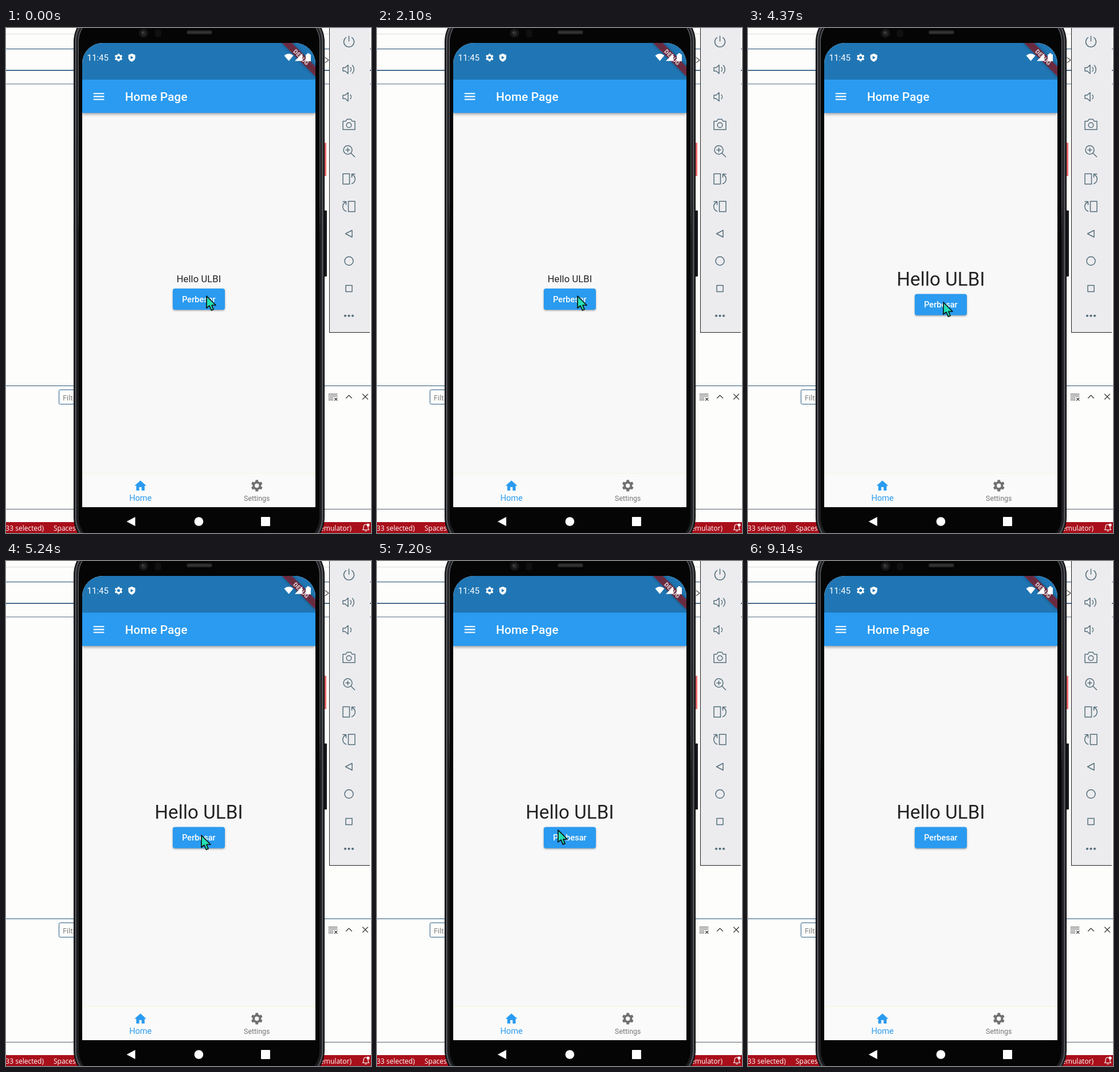
Recreate the animation shown at these times as an HTML page with a canvas. Size 637x880 px, loop 9.2 s.

```html
<!DOCTYPE html>
<html lang="en">
<head>
<meta charset="utf-8">
<title>Phone emulator</title>
<style>
html, body { margin: 0; width: 100%; height: 100%; overflow: hidden; background: #fdfdfd; }
canvas { display: block; width: 637px; height: 880px; }
</style>
</head>
<body>
<canvas id="stage" width="637" height="880"></canvas>
<script>
const ctx = document.getElementById('stage').getContext('2d');
const LOOP = 9200;
const GROW_AT = 2600;
const BLUE = '#2a9bf0';
const INK = '#566f7b';

// time, x, y of the pointer
const pointerKeys = [
  [0, 350, 467], [2900, 350, 467], [3400, 306, 461], [3700, 306, 461],
  [4300, 341, 478], [5600, 341, 478], [5800, 341, 480], [7100, 341, 480],
  [7700, 10, 333], [8480, 10, 333], [8640, -30, 333], [LOOP, -30, 333]
];

function rect(x, y, w, h, color) {
  ctx.fillStyle = color;
  ctx.fillRect(x, y, w, h);
}

function round(x, y, w, h, r, color) {
  ctx.beginPath();
  ctx.roundRect(x, y, w, h, r);
  ctx.fillStyle = color;
  ctx.fill();
}

function disc(x, y, r, color) {
  ctx.beginPath();
  ctx.arc(x, y, r, 0, Math.PI * 2);
  ctx.fillStyle = color;
  ctx.fill();
}

function text(str, x, y, font, color, align = 'left', spacing = 0) {
  ctx.font = font;
  ctx.fillStyle = color;
  ctx.textAlign = align;
  ctx.letterSpacing = spacing + 'px';
  ctx.fillText(str, x, y);
}

function at(x, y, draw) {
  ctx.save();
  ctx.translate(x, y);
  draw();
  ctx.restore();
}

function fillPath(x, y, d, color, scale = 1) {
  at(x, y, () => {
    ctx.scale(scale, scale);
    ctx.fillStyle = color;
    ctx.fill(new Path2D(d), 'evenodd');
  });
}

function strokePath(x, y, d, color = INK, width = 1.5) {
  at(x, y, () => {
    ctx.strokeStyle = color;
    ctx.lineWidth = width;
    ctx.lineCap = ctx.lineJoin = 'round';
    ctx.stroke(new Path2D(d));
  });
}

function gear(x, y, r, color) {
  ctx.beginPath();
  for (let k = 0; k < 6; k++) {
    const a = k * Math.PI / 3 - Math.PI / 2;
    for (const [m, d] of [[0.74, -0.34], [1, -0.22], [1, 0.22], [0.74, 0.34]]) {
      ctx.lineTo(x + r * m * Math.cos(a + d), y + r * m * Math.sin(a + d));
    }
  }
  ctx.closePath();
  ctx.moveTo(x + r * 0.36, y);
  ctx.arc(x, y, r * 0.36, 0, Math.PI * 2);
  ctx.fillStyle = color;
  ctx.fill('evenodd');
}

function shadow(color, blur, dy) {
  ctx.shadowColor = color;
  ctx.shadowBlur = blur;
  ctx.shadowOffsetY = dy;
}

function drawEditor() {
  rect(0, 0, 637, 880, '#fdfdfc');
  rect(0, 10, 637, 1, '#dcdcdc');
  rect(0, 36, 637, 1, '#1f4a6e');
  rect(0, 73, 637, 1.5, '#123f68');
  rect(0, 97, 637, 1, '#5d7487');
  strokePath(557, 56, 'M0-4.5L6 0 0 4.5', '#444', 1.1);
  rect(0, 623, 637, 1, '#2d5876');
  rect(0, 838, 637, 1, '#55616a');

  ctx.strokeStyle = '#2b5f86';
  ctx.lineWidth = 1;
  ctx.beginPath();
  ctx.roundRect(92.5, 630.5, 60, 25, 2);
  ctx.stroke();
  text('Filter', 99, 649, '13px "Open Sans", sans-serif', '#777');

  strokePath(563, 643, 'M0-5H15M0-1.7H15M0 1.7H8M0 5H8M10.5 1.5L15 6M15 1.5L10.5 6', '#333', 1.1);
  strokePath(598.5, 642.5, 'M-5 2.5L0-2.5 5 2.5', '#333', 1.1);
  strokePath(627, 642.5, 'M-4.5-4.5L4.5 4.5M4.5-4.5L-4.5 4.5', '#333', 1.1);

  rect(0, 861, 637, 19, '#a90f1b');
  const font = '12px "Open Sans", sans-serif';
  text('33 selected)', 66, 876, font, '#fff', 'right');
  text('Spaces: 2', 83, 876, font, '#fff');
  text('emulator)', 603, 876, font, '#fff', 'right');
  strokePath(628, 871, 'M-5.5 3.5H5.5L4 1V-2A4 4 0 0 0-4-2V1ZM-1.5 5.5H1.5', '#fff', 1.2);
  disc(632, 866, 2.6, '#fff');
}

function drawToolbar() {
  rect(564, 0, 71, 530.5, '#ececef');
  rect(564, 0, 1, 531, '#222');
  rect(564, 530, 71, 1, '#222');
  const speaker = 'M-10.5-3H-6.5L-1.5-7.5V7.5L-6.5 3H-10.5Z';
  const icons = [
    [24, 'M0-10V-1M-5-7.5A9 9 0 1 0 5-7.5'],
    [72, speaker + 'M2.5-3.5A5 5 0 0 1 2.5 3.5M6-7A10 10 0 0 1 6 7'],
    [120, speaker + 'M2.5-3.5A5 5 0 0 1 2.5 3.5'],
    [168, 'M-10.5-5.5H-5.5L-3.5-9H3.5L5.5-5.5H10.5V9H-10.5ZM4.3 1.3A4.3 4.3 0 1 0-4.3 1.3A4.3 4.3 0 1 0 4.3 1.3'],
    [215, 'M5.5-2.5A7.5 7.5 0 1 0-9.5-2.5A7.5 7.5 0 1 0 5.5-2.5M3.5 3L10 9.5M-5.5-2.5H1.5M-2-6V1'],
    [263, 'M-10.5-9H1V9H-10.5ZM5 8.5C12.5 5 12.5-4 6-7.5M5-3V-8.5H10.5'],
    [311, 'M10.5-9H-1V9H10.5ZM-5 8.5C-12.5 5-12.5-4-6-7.5M-5-3V-8.5H-10.5'],
    [358.5, 'M5.5-6V6L-6 0Z'],
    [406, 'M7.5 0A7.5 7.5 0 1 0-7.5 0A7.5 7.5 0 1 0 7.5 0'],
    [454, 'M-5.5-5.5H5.5V5.5H-5.5Z']
  ];
  for (const [y, d] of icons) strokePath(598.5, y, d);
  for (const dx of [-6.5, 0, 6.5]) disc(598.5 + dx, 501.5, 2.1, INK);
}

function drawBody() {
  rect(554, 200, 5, 58, '#e4686a');
  round(554, 318, 6, 115, 1, '#17181a');
  const shell = (inset, color) =>
    round(118 + inset, -31 + inset, 438 - 2 * inset, 939 - 2 * inset, 55 - inset, color);
  const shine = ctx.createLinearGradient(0, 0, 0, 370);
  shine.addColorStop(0, '#5c5e63');
  shine.addColorStop(0.8, '#4a4c50');
  shine.addColorStop(1, '#1c1d1f');
  shell(0, '#0b0b0c');
  shell(2, '#4a4c51');
  shell(5, '#1c1d1f');
  shell(7.5, shine);
  shell(9, '#050505');
  disc(240, 9, 8, '#161616');
  disc(240, 9, 4, '#2a2a2a');
  disc(238.5, 7.5, 1.3, '#555');
  round(260, 3, 11, 13, 4, '#101010');
  round(315, 4, 45, 7, 3.5, '#232323');
  round(317, 6, 41, 3, 1.5, '#343434');
}

function drawStatusIcons() {
  text('11:45', 141.5, 57, '15px Roboto, sans-serif', '#fff');
  gear(196.5, 51.5, 7, '#fff');
  fillPath(219.5, 51.5, 'M0-7L6-4.5V0C6 3.5 3.5 6 0 7.2C-3.5 6-6 3.5-6 0V-4.5ZM-2-3V3L3 0Z', '#fff');
  fillPath(493.5, 57.5, 'M0 0L-8-9.5Q0-16 8-9.5Z', '#fff');
  fillPath(504, 57.5, 'M0 0H13V-13Z', '#fff');
  fillPath(527.5, 51, 'M-4.5-5H-2V-7H2V-5H4.5V7H-4.5Z', '#fff');
}

function drawBanner() {
  at(540, 26, () => {
    ctx.rotate(Math.PI / 4);
    ctx.scale(1.034, 1.034);
    ctx.save();
    shadow('rgba(0,0,0,.5)', 6, 0);
    rect(-40, 28, 80, 12, 'rgba(150,20,30,.65)');
    ctx.restore();
    text('DEBUG', 0, 37.6, '900 10.2px Roboto, sans-serif', 'rgba(255,255,255,.75)', 'center');
  });
}

function drawBottomNav() {
  rect(133, 776, 407, 59.5, '#fafafa');
  rect(133, 776, 407, 1, '#f8f5d2');
  fillPath(222.2, 785.4, 'M10 20v-6h4v6h5v-8h3L12 3 2 12h3v8z', BLUE, 1.034);
  gear(437.8, 797.5, 10.3, '#707070');
  text('Home', 234.7, 823.5, '14.5px Roboto, sans-serif', BLUE, 'center');
  text('Settings', 437.7, 824, '12.4px Roboto, sans-serif', '#757575', 'center');
}

function drawApp(large) {
  ctx.save();
  ctx.beginPath();
  ctx.roundRect(133, 26, 407, 809, [36, 36, 0, 0]);
  ctx.clip();
  rect(133, 26, 407, 810, '#f8f8f8');
  ctx.save();
  shadow('rgba(0,0,0,.4)', 5, 2);
  rect(133, 90, 407, 58, BLUE);
  ctx.restore();
  rect(133, 26, 407, 64, '#2076b4');
  fillPath(149.6, 107, 'M3 18h18v-2H3zM3 13h18v-2H3zM3 6v2h18V6z', '#fff', 1.034);
  text('Home Page', 207.8, 126.6, '500 20.7px Roboto, sans-serif', '#fff', 'left', 0.1);

  text('Hello ULBI', 336.5, large ? 449 : 443.4,
    `${large ? 33.1 : 16.55}px Roboto, sans-serif`, '#212121', 'center', 0.1);
  const top = large ? 463.5 : 454;
  ctx.save();
  shadow('rgba(0,0,0,.35)', 3, 1.5);
  round(291, top, 91, 37, 4, BLUE);
  ctx.restore();
  text('Perbesar', 336.4, top + 23.7, '500 14.5px Roboto, sans-serif', '#fff', 'center');

  drawBottomNav();
  drawBanner();
  drawStatusIcons();
  ctx.restore();

  fillPath(218, 860, 'M-7.5 0L7.5-8V8Z', '#fff');
  disc(336.5, 860, 7.8, '#fff');
  round(445, 852, 16, 16, 1, '#fff');
}

function pointerAt(t) {
  const i = pointerKeys.findIndex(key => key[0] > t);
  const [t0, x0, y0] = pointerKeys[i - 1];
  const [t1, x1, y1] = pointerKeys[i];
  const p = (t - t0) / (t1 - t0);
  const e = p * p * (3 - 2 * p);
  return [x0 + (x1 - x0) * e, y0 + (y1 - y0) * e];
}

function drawPointer(x, y) {
  if (x < 118) {
    const beam = 'M-6-11H-2L0-9 2-11H6M0-9V9M-6 11H-2L0 9 2 11H6';
    strokePath(x, y, beam, '#10241c', 5);
    strokePath(x, y, beam, '#2fc08a', 2);
    return;
  }
  const arrow = 'M0 0V21L5 17 8.5 25 12 23.5 9 16H16Z';
  fillPath(x, y, arrow, '#25e0b4');
  strokePath(x, y, arrow, '#0b1512', 1.7);
}

function frame(now) {
  const t = now % LOOP;
  drawEditor();
  drawToolbar();
  drawBody();
  drawApp(t >= GROW_AT);
  drawPointer(...pointerAt(t));
  requestAnimationFrame(frame);
}
requestAnimationFrame(frame);
</script>
</body>
</html>
```
